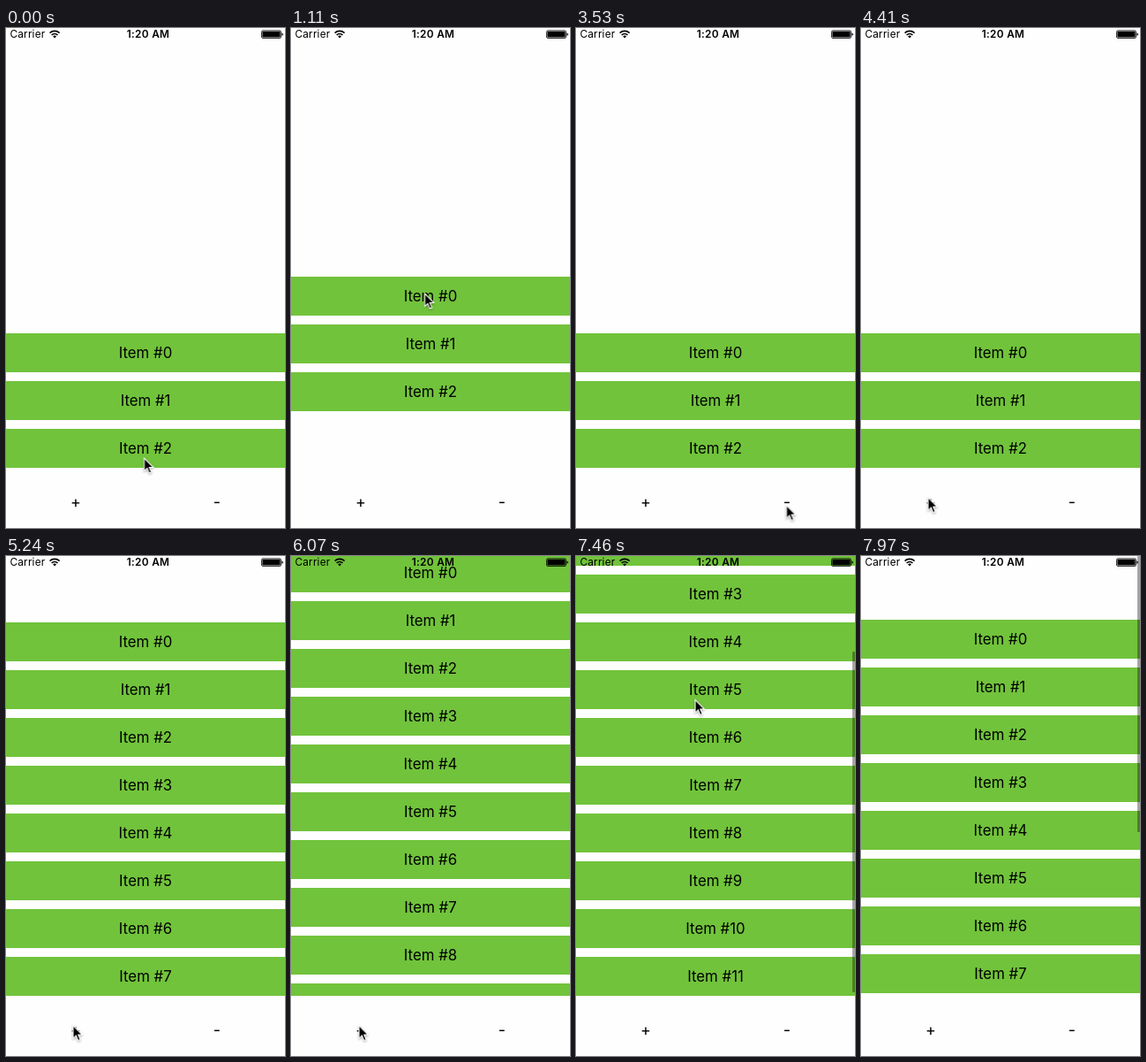
These frames come from a looping animation (316 by 565 pixels, 8000 ms). An HTML page:

```html
<!DOCTYPE html>
<html lang="en">
<head>
<meta charset="utf-8">
<title>Bottom list</title>
<style>
html, body { margin: 0; width: 100%; height: 100%; overflow: hidden; background: #fefefe; }
body { position: relative; font-family: Inter, "Liberation Sans", sans-serif; color: #000; }
body > *, .list, .item { position: absolute; }

.view { left: 0; top: 0; width: 316px; height: 497px; overflow: hidden; }
.list { left: 0; top: 0; width: 100%; animation: list 8s linear infinite; }
.item {
  left: 0; width: 100%; height: 44px; background: #71c33b;
  font-size: 16.8px; line-height: 44px; text-align: center;
}
.third { animation: third 8s step-end infinite; }
.extra { animation: extra 8s step-end infinite; }
.bar {
  position: absolute; left: 313px; width: 3px; border-radius: 1px;
  background: rgba(0, 0, 0, .35); animation: bar 8s linear infinite;
}

.carrier, .clock { top: 0; height: 14px; font-size: 11.85px; line-height: 14px; white-space: nowrap; }
.carrier { left: 4.5px; letter-spacing: .15px; }
.clock { left: 111px; width: 100px; text-align: center; font-weight: 600; letter-spacing: .3px; }
.icons { left: 0; top: 0; }
.button { top: 516px; width: 158px; height: 40px; font-size: 18px; line-height: 40px; text-align: center; }
.plus { left: 0; }
.minus { left: 160px; }
.cursor {
  left: 0; top: 0; overflow: visible;
  filter: drop-shadow(0 1px 1px rgba(0, 0, 0, .35));
  animation: cursor 8s linear infinite;
}

@keyframes list {
  0%, 11.5% { transform: translateY(345px); }
  11.875% { transform: translateY(330px); }
  12.625% { transform: translateY(305px); }
  13.25% { transform: translateY(291px); }
  13.875%, 14.5% { transform: translateY(281px); }
  15.375%, 16.375% { transform: translateY(273px); }
  16.75% { transform: translateY(287px); animation-timing-function: ease-out; }
  19.75%, 23.125% { transform: translateY(345px); }
  23.875% { transform: translateY(352px); }
  25% { transform: translateY(370px); }
  26.25% { transform: translateY(391px); }
  27.5% { transform: translateY(407px); }
  28.625% { transform: translateY(415px); }
  29.25% { transform: translateY(419px); }
  32.125% { transform: translateY(419px); animation-timing-function: cubic-bezier(.25, .3, .25, 1); }
  39.25% { transform: translateY(345px); animation-timing-function: step-end; }
  45.625% { transform: translateY(399px); animation-timing-function: step-end; }
  55.125% { transform: translateY(345px); animation-timing-function: step-end; }
  56.625% { transform: translateY(291px); animation-timing-function: step-end; }
  59.625% { transform: translateY(237px); animation-timing-function: step-end; }
  61.75% { transform: translateY(183px); animation-timing-function: step-end; }
  63.25% { transform: translateY(129px); animation-timing-function: step-end; }
  65.5% { transform: translateY(75px); animation-timing-function: step-end; }
  66.875% { transform: translateY(21px); animation-timing-function: step-end; }
  68.375%, 82.25% { transform: translateY(-3px); }
  82.5% { transform: translateY(-10px); }
  83.25% { transform: translateY(-50px); }
  84% { transform: translateY(-100px); }
  84.75% { transform: translateY(-145px); }
  85.375% { transform: translateY(-172px); }
  86% { transform: translateY(-186px); }
  88.125% { transform: translateY(-186px); animation-timing-function: cubic-bezier(.25, .3, .25, 1); }
  93.125%, 95.25% { transform: translateY(-141px); }
  96.125% { transform: translateY(-115px); }
  97% { transform: translateY(-70px); }
  97.625% { transform: translateY(-35px); }
  98.25%, 98.75% { transform: translateY(5px); }
  98.875% { transform: translateY(62px); }
  99.625%, 100% { transform: translateY(72px); }
}
@keyframes third {
  0%, 55.125% { visibility: visible; }
  45.625% { visibility: hidden; }
}
@keyframes extra {
  0% { visibility: hidden; }
  56.625%, 100% { visibility: visible; }
}
@keyframes bar {
  0% { opacity: 0; top: 2px; height: 385px; animation-timing-function: step-end; }
  82.25% { opacity: 1; top: 2px; height: 385px; }
  82.5% { top: 8px; height: 385px; }
  84.75% { top: 112px; height: 381px; }
  85.375% { top: 139px; height: 354px; }
  86% { top: 153px; height: 340px; }
  88.125% { top: 153px; height: 340px; animation-timing-function: cubic-bezier(.25, .3, .25, 1); }
  93.125%, 95.25% { top: 108px; height: 385px; }
  96.125% { top: 88px; height: 385px; }
  97% { top: 54px; height: 385px; }
  97.625% { top: 27px; height: 385px; }
  98.25%, 98.75% { top: 0; height: 380px; }
  98.875% { top: 0; height: 323px; }
  99.625%, 100% { opacity: 1; top: 0; height: 312px; }
}
@keyframes cursor {
  0%, 1.375% { transform: translate(156.5px, 486px); visibility: visible; }
  1.5% { transform: translate(156px, 482px); animation-timing-function: ease-out; }
  6.625%, 8.75% { transform: translate(146px, 451px); }
  9.625%, 11.375% { transform: translate(146.5px, 453px); }
  11.875% { transform: translate(147px, 405px); }
  12.625% { transform: translate(149px, 354px); }
  13.25% { transform: translate(150px, 323px); }
  13.875%, 14.5% { transform: translate(151.5px, 300px); }
  15.375%, 23.125% { transform: translate(150px, 288px); }
  23.875% { transform: translate(150px, 305px); }
  25% { transform: translate(149px, 341px); }
  26.25% { transform: translate(148px, 385px); }
  27.5% { transform: translate(147.5px, 422px); }
  28.625% { transform: translate(147.5px, 442px); }
  29.25% { transform: translate(147.5px, 452.5px); }
  34% { transform: translate(147.5px, 452.5px); animation-timing-function: ease-in-out; }
  42% { transform: translate(232px, 534px); animation-timing-function: ease-out; }
  44.875% { transform: translate(239px, 540px); }
  47.5% { transform: translate(239px, 540px); animation-timing-function: ease-in-out; }
  54.5%, 66.75% { transform: translate(76px, 530.5px); }
  68.375% { transform: translate(77px, 530.5px); }
  76.5% { transform: translate(77px, 530.5px); animation-timing-function: ease-in-out; }
  80.25%, 82.25% { transform: translate(136px, 403px); }
  82.5% { transform: translate(136px, 383px); }
  83.25% { transform: translate(136px, 343px); }
  84% { transform: translate(135px, 293px); }
  84.75% { transform: translate(135px, 246px); }
  85.375% { transform: translate(135px, 198px); }
  86%, 95% { transform: translate(135px, 162.5px); }
  96.125% { transform: translate(136px, 201px); }
  97% { transform: translate(138px, 246px); }
  97.625% { transform: translate(139px, 281px); }
  98.25%, 98.75% { transform: translate(140px, 325px); }
  98.875%, 99.5% { transform: translate(143px, 498px); visibility: visible; }
  99.625%, 100% { transform: translate(143px, 498px); visibility: hidden; }
}
</style>
</head>
<body>
<div class="view">
  <div class="list" id="list"></div>
  <div class="bar"></div>
</div>

<div class="carrier">Carrier</div>
<div class="clock">1:20 AM</div>
<svg class="icons" width="316" height="16">
  <g fill="none" stroke="#000" stroke-width="1.7">
    <path d="M49.6 5.6a8 8 0 0 1 11 0M51.7 8a5 5 0 0 1 6.8 0"/>
  </g>
  <path d="M53.2 9.4a2.8 2.8 0 0 1 3.8 0l-1.9 2.1z"/>
  <rect x="289.5" y="2.9" width="22" height="8.6" rx="1.5" fill="none" stroke="#000" stroke-width=".8"/>
  <rect x="290.4" y="3.8" width="20.2" height="6.8" rx=".6"/>
  <path d="M312.5 5.6q1.4 .4 1.4 1.6t-1.4 1.6z"/>
</svg>

<div class="button plus">+</div>
<div class="button minus">-</div>

<svg class="cursor" width="12" height="19">
  <path d="M0 0V14.6L3.4 11.4L5.8 17.1L8.2 16.1L5.8 10.5H10.4Z" stroke="#fff" stroke-width="1.1"/>
</svg>

<script>
const list = document.getElementById('list');
for (let i = 0; i < 12; i++) {
  const item = document.createElement('div');
  item.className = 'item' + (i === 2 ? ' third' : i > 2 ? ' extra' : '');
  item.style.top = i * 54 + 'px';
  item.textContent = 'Item #' + i;
  list.append(item);
}
</script>
</body>
</html>
```
